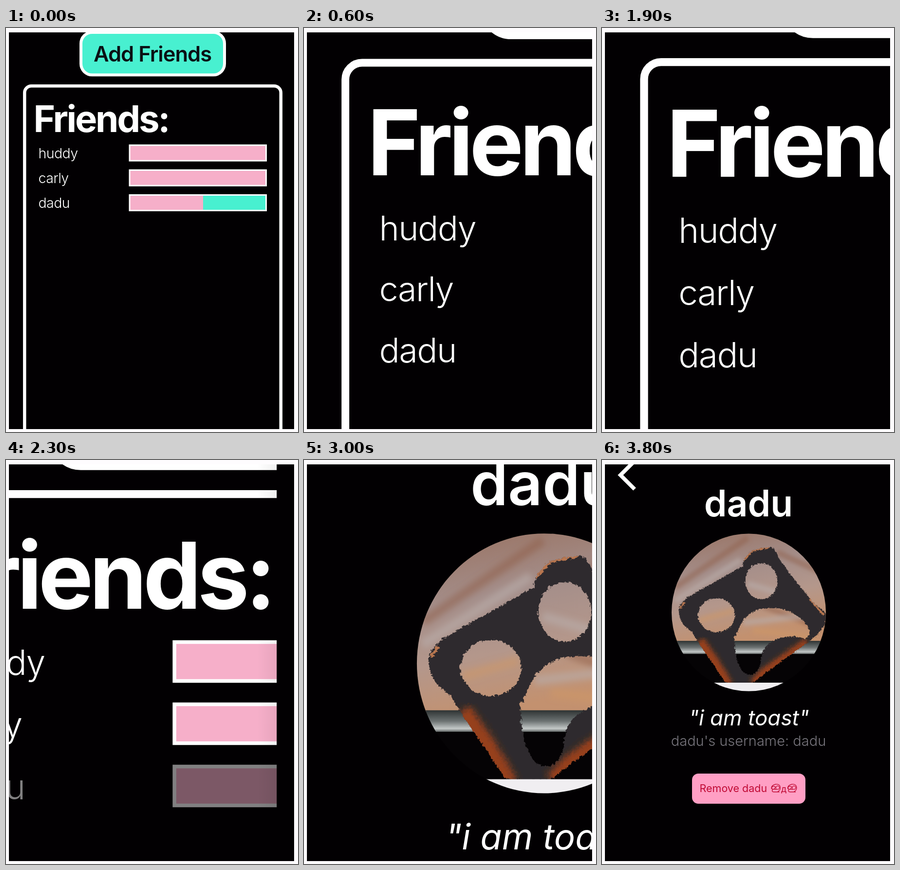
An HTML page that plays this animation: 600x831 px, repeating every 3900 ms.

```html
<!DOCTYPE html>
<html lang="en">
<head>
<meta charset="utf-8">
<title>Friends</title>
<style>
  html, body { margin: 0; width: 100%; height: 100%; overflow: hidden; background: #fefcfe; }
  svg { display: block; width: 600px; height: 831px; }
  text { font-family: Inter, "Noto Sans", sans-serif; font-optical-sizing: none; fill: #fff; }
  .mid { text-anchor: middle; }
  .heading { font-size: 76px; font-weight: 700; letter-spacing: -.042em; }
  .add { font-size: 43.5px; font-weight: 600; letter-spacing: -.023em; fill: #0a1014; }
  .name { font-size: 28.5px; font-weight: 300; letter-spacing: -.02em; }
  .title { font-size: 75px; font-weight: 600; }
  .quote { font-size: 44px; font-style: italic; }
  .user { font-size: 29px; font-weight: 300; fill: #78757d; }
  .remove { font-size: 21.5px; fill: #c00a34; }
  .small { font-size: 18px; }
</style>
</head>
<body>
<svg viewBox="0 0 600 831">
  <defs>
    <clipPath id="stage"><rect x="6" y="9" width="586" height="816"/></clipPath>
    <clipPath id="avatar"><ellipse cx="301.5" cy="313.5" rx="158.5" ry="162"/></clipPath>
    <linearGradient id="wood" x1="0" y1="0" x2=".3" y2="1">
      <stop offset="0" stop-color="#98705f"/>
      <stop offset=".4" stop-color="#a48e8a"/>
      <stop offset=".7" stop-color="#b4978b"/>
      <stop offset="1" stop-color="#c3916f"/>
    </linearGradient>
    <linearGradient id="metal" x2="0" y2="1">
      <stop offset="0" stop-color="#2e3333"/>
      <stop offset=".5" stop-color="#6c7272"/>
      <stop offset=".85" stop-color="#c4c9c8"/>
      <stop offset="1" stop-color="#5a5e5e"/>
    </linearGradient>
    <linearGradient id="shade">
      <stop offset="0" stop-opacity="0"/>
      <stop offset="1" stop-opacity=".06"/>
    </linearGradient>
    <filter id="soft"><feGaussianBlur stdDeviation="4"/></filter>
    <filter id="rough">
      <feTurbulence baseFrequency=".2" numOctaves="2" seed="4"/>
      <feDisplacementMap in="SourceGraphic" scale="5" xChannelSelector="R" yChannelSelector="G"/>
    </filter>
    <path id="toast" clip-rule="evenodd" fill-rule="evenodd" d="M156 310Q157 290 185 275L288 217Q288 200 308 184L345 177Q357 183 360 198L380 226L435 295Q460 310 460 322Q456 350 420 375L330 440L308 458H253L230 423L204 385L184 353Q157 335 156 310Z
      M196 318a38 35 0 1 0 76 0a38 35 0 1 0-76 0Z
      M293 248a33 37 0 1 0 66 0a33 37 0 1 0-66 0Z
      M275 360Q282 322 318 307Q360 295 395 316Q428 338 425 358L416 367Q392 357 360 366Q328 380 326 405Q322 440 304 441Q282 440 274 400L270 362Z"/>
    <clipPath id="crust"><use href="#toast"/></clipPath>
    <path id="swirl" d="M9 9a3.5 3.5 0 1 1-3-3c5-1 6 4 6 8M12 9a4 4 0 1 1 4 4H6a3 3 0 0 0 0 6h14M1.5 12C-1 0 22-4 22 9c0 6-3 8-6 9"
      fill="none" stroke="#c00a34" stroke-width="1.5"/>
  </defs>

  <g clip-path="url(#stage)">
    <rect width="600" height="831" fill="#020002"/>
    <g id="camera">
      <g id="list">
        <rect x="154" y="9" width="295" height="87.5" rx="23" fill="#48f0d0" stroke="#fff" stroke-width="6"/>
        <text class="add mid" x="301" y="69">Add Friends</text>
        <rect x="38.2" y="119.2" width="526.6" height="800" rx="14" fill="none" stroke="#fff" stroke-width="6.5"/>
        <text class="heading" x="56.6" y="213.5">Friends:</text>
      </g>

      <g id="profile">
        <rect x="-10" width="16" y="-200" height="1400" fill="url(#shade)"/>
        <rect id="gap" x="-10" width="16" y="-200" height="1400" fill="#f4f2f6"/>
        <rect x="6" width="700" y="-200" height="1400" fill="#020002"/>
        <path d="M67 2L38 31L67 60" fill="none" stroke="#fff" stroke-width="8"/>
        <text class="title mid" x="301" y="116">dadu</text>

        <g clip-path="url(#avatar)">
          <rect x="140" y="150" width="322" height="224" fill="url(#wood)"/>
          <g filter="url(#soft)" fill="none" stroke-width="12">
            <path d="M150 262L300 160M330 300L450 345M360 190L460 235" stroke="#8f5d49" opacity=".5"/>
            <path d="M150 290L285 205M300 255L370 275M290 335L420 320" stroke="#b9adab" opacity=".6"/>
            <path d="M200 330L270 310M310 350L440 365" stroke="#cf9767" opacity=".5"/>
          </g>
          <rect x="140" y="372" width="322" height="27" fill="url(#metal)"/>
          <rect x="140" y="399" width="322" height="59" fill="#050305"/>
          <g filter="url(#rough)">
            <use href="#toast" fill="#2f2b2d"/>
            <g clip-path="url(#crust)" fill="none">
              <path d="M198 372L226 412L256 462M312 460L334 438L422 376" stroke="#963f1e" stroke-width="24" filter="url(#soft)"/>
              <path d="M160 304L168 291M290 205L308 185L342 178M425 284L455 318" stroke="#b87650" stroke-width="4"/>
            </g>
          </g>
          <rect x="140" y="458" width="322" height="20" fill="#f0eef1"/>
        </g>

        <text class="quote mid" x="302" y="545.5">"i am toast"</text>
        <text class="user mid" x="301" y="588">dadu's username: dadu</text>
        <rect x="185" y="645" width="233" height="62" rx="13" fill="#ff9fc4"/>
        <text class="remove" x="200.5" y="683">Remove dadu</text>
        <use href="#swirl" transform="translate(347 666) scale(.88)"/>
        <text class="remove small mid" x="373.5" y="683">д</text>
        <use href="#swirl" transform="translate(380.5 666) scale(.88)"/>
      </g>
    </g>
  </g>
</svg>

<script>
const LOOP = 3900, STEP = 100, WIDTH = 586, ZOOM = 1.5;
const $ = id => document.getElementById(id);
const [camera, list, profile, gap] = ['camera', 'list', 'profile', 'gap'].map($);

const row = (name, i, pink) => {
  const y = 241 + 51.2 * i;
  return `<g>
    <text class="name" x="66.5" y="${y + 27}">${name}</text>
    <rect x="254" y="${y}" width="280.5" height="32" fill="#48f0d0"/>
    <rect x="254" y="${y}" width="${pink}" height="32" fill="#f6afc9"/>
    <rect x="254" y="${y}" width="280.5" height="32" fill="none" stroke="#fff" stroke-width="3"/>
  </g>`;
};
list.insertAdjacentHTML('beforeend', row('huddy', 0, 280) + row('carly', 1, 280) + row('dadu', 2, 151));
const tapped = list.lastElementChild;

const ramp = (t, from, to) => Math.min(1, Math.max(0, (t - from) / (to - from)));
const ease = u => u < .5 ? 4 * u ** 3 : 1 - 4 * (1 - u) ** 3;
// Critically damped spring settling at 1
const spring = t => t <= 0 ? 0 : 1 - (1 + .0195 * t) * Math.exp(-.0195 * t);

function draw(t) {
  const scale = 1 + ZOOM * (ease(ramp(t, 190, 700)) - ease(ramp(t, 2733, 3243)));
  const push = spring(t - 2191.5);
  const left = WIDTH * (1 - push);
  camera.setAttribute('transform', `translate(6 152) scale(${scale}) translate(-6 -152)`);
  list.setAttribute('transform', `translate(${-.306 * WIDTH * push} 0)`);
  profile.setAttribute('transform', `translate(${left} 0)`);
  gap.setAttribute('visibility', left < 4 ? 'visible' : 'hidden');
  tapped.setAttribute('opacity', 1 - .5 * ramp(t, 2000, 2200));
}

function tick() {
  draw(Math.floor(performance.now() % LOOP / STEP) * STEP);
  requestAnimationFrame(tick);
}
tick();
</script>
</body>
</html>
```
